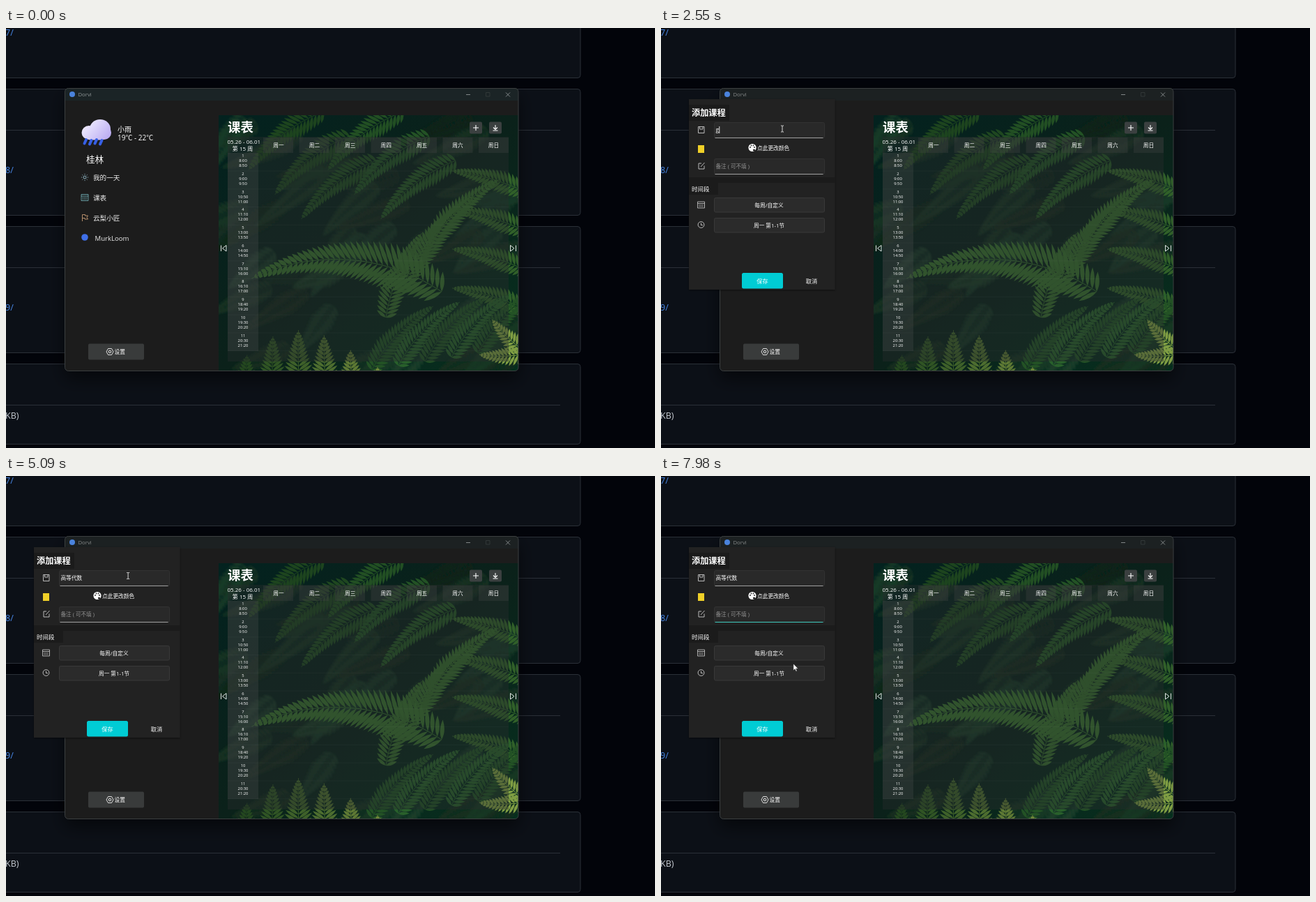
Write an HTML page that moves like this. It is 931 px wide and 602 px high and loops after 8000 ms.

```html
<!DOCTYPE html>
<html lang="zh-CN">
<head>
<meta charset="utf-8">
<style>
html, body { margin: 0; width: 100%; height: 100%; overflow: hidden; background: #02040a; }
svg { display: block; font-family: "Open Sans", "Noto Sans CJK SC", "Noto Sans CJK", sans-serif; }
text { white-space: pre; }
</style>
</head>
<body>
<svg id="stage" width="931" height="602" viewBox="0 0 931 602"></svg>
<script>
const LOOP = 8000, STEP = 200 / 3;
const clamp = v => Math.max(0, Math.min(1, v));
const ease = k => k * k * (3 - 2 * k);

// Markup helpers
const rect = (x, y, w, h, fill, extra = '') =>
  `<rect x="${x}" y="${y}" width="${w}" height="${h}" fill="${fill}" ${extra}/>`;
const text = (x, y, size, str, fill = '#fff', extra = '') =>
  `<text x="${x}" y="${y}" font-size="${size}" fill="${fill}" ${extra}>${str}</text>`;
const mid = (x, y, size, str, fill) => text(x, y, size, str, fill, 'text-anchor="middle"');
const line = (d, stroke = '#ddd', width = .9, extra = '') =>
  `<path d="${d}" fill="none" stroke="${stroke}" stroke-width="${width}" ${extra}/>`;
const dot = (x, y, r, fill, extra = '') => `<circle cx="${x}" cy="${y}" r="${r}" fill="${fill}" ${extra}/>`;
const repeat = (n, make) => Array.from({ length: n }, (_, i) => make(i)).join('');

let seed = 11;
const rnd = (a, b) => a + (b - a) * (seed = seed * 16807 % 2147483647) / 2147483647;

// One fern frond: leaflet pairs along a spine that turns by `bend` degrees
function frond(x, y, heading, length, bend, size, fill) {
  const gap = 3.5 + size * .09, n = Math.round(length / gap);
  let leaves = '', spine = `M${x} ${y}`;
  for (let i = 0; i <= n; i++) {
    const t = i / n, dir = (heading + bend * t) * Math.PI / 180;
    const len = 3 + size * (1 - t) ** .75 * Math.min(1, .55 + t * 2);
    for (const side of [-1, 1]) {
      const a = dir + side * (1.05 - .3 * t), c = Math.cos(a) * len, s = Math.sin(a) * len;
      const k = gap * .8 / len;
      const at = (u, v) => `${(x + c * u - s * v).toFixed(1)} ${(y + s * u + c * v).toFixed(1)}`;
      leaves += `M${at(0, 0)}Q${at(.45, k)} ${at(1, 0)}Q${at(.45, -k)} ${at(0, 0)}`;
    }
    x += Math.cos(dir) * gap;
    y += Math.sin(dir) * gap;
    spine += `L${x.toFixed(1)} ${y.toFixed(1)}`;
  }
  return `<path d="${leaves}" fill="${fill}"/>` + line(spine, fill, 1);
}

const green = (light, hue = 122) => `hsl(${hue} 40% ${light}%)`;

function ferns() {
  const blurred = repeat(40, () =>
    frond(rnd(340, 760), rnd(120, 470), rnd(125, 165), rnd(70, 130), rnd(-20, 20), 24, green(rnd(10, 18), 145)));
  return '<svg x="305" y="125" width="430" height="366" viewBox="305 125 430 366">' +
    rect(305, 125, 430, 366, 'url(#leafBase)') + `<g filter="url(#blur)">${blurred}</g>` +
    repeat(6, i => frond(455 + i * 38, 120 + i % 3 * 35, 158, 130, -32, 25, green(19 + i))) +
    repeat(4, i => frond(745, 235 + i * 56, 205, 105, -18, 22, green(27, 112))) +
    repeat(5, i => frond(525 + i * 38, 490 - i * 6, 298, 120, 32, 23, green(23 + i % 2 * 4))) +
    repeat(4, i => frond(545 + i * 22, 415 - i * 36, 280 + i * 8, 125, 26, 25, green(29, 110))) +
    frond(625, 378, 213, 275, -58, 47, green(31, 112)) +
    repeat(6, i => {
      const height = 40 + 36 * Math.sin(i * .72);
      return frond(345 + i * 38, 514, 268 - i, height, 6, 8 + height * .23, green(20 + i * 3.5, 112 - i * 7));
    }) +
    repeat(2, i => frond(745, 464 + i * 3, 215 - i * 45, 62, 18, 18, green(44, 80))) + '</svg>';
}

function page() {
  const boxes = repeat(4, i => rect(-20, 87.5 + (i - 1) * 197, 844, i < 3 ? 181 : 115, '#0c1017', 'rx="4" stroke="#2b3038"'));
  return rect(0, 0, 931, 602, '#02040a') + boxes +
    repeat(3, i => line(`M0 ${146.5 + i * 197}H795`, '#2b3038', 1) + text(-1, 11 + i * 197, 12.5, 7 + i + '/', '#4787e8')) +
    text(-1, 560, 12.5, 'KB)', '#c4c9d0');
}

const calendar = (x, y, c) => line(`M${x - 5} ${y - 4.5}h10v9h-10zm0 2.5h10`, c, .8) +
  line(`M${x - 3.2} ${y + .3}h7m-7 2h7`, c, 1, 'stroke-dasharray="1.2 1"');

function sidebar() {
  const cloud = '<g fill="url(#cloud)"><ellipse cx="119" cy="150" rx="10.5" ry="10"/><ellipse cx="135" cy="145" rx="15" ry="14"/>' +
    '<ellipse cx="141" cy="150" rx="10" ry="10"/>' + rect(115, 148, 28, 12.5, 'url(#cloud)', 'rx="6"') + '</g>';
  const rain = repeat(4, i => line(`M${115 + i * 7.5} ${160 + i % 2}l-2.5 5.5`, '#3760e6', 4, 'stroke-linecap="round"'));
  const rays = repeat(8, i => line('M113 210.2v-1.3', '#8fb6c4', .9, `transform="rotate(${i * 45} 113 214)"`));
  return cloud + rain + text(160, 149, 10, '小雨') + text(160, 161, 10, '19℃ - 22℃') + text(115, 193, 12.6, '桂林') +
    ['我的一天', '课表', '云梨小匠'].map((str, i) => text(125, 218 + i * 29, 9.6, str, '#eee')).join('') +
    text(127.5, 304.5, 9.6, 'MurkLoom', '#eee') +
    dot(113, 214, 2, 'none', 'stroke="#8fb6c4"') + rays + calendar(113, 243, '#77b9c0') +
    line('M109.500 277v-9.500h4v1.500h4l-1.500 2.500 1.500 2.500h-4.500v-1.500h-3.500', '#c69a73') + dot(113, 300, 4.8, '#3f6fe8') +
    rect(118, 452.5, 80, 23, '#393b3b', 'rx="2"') + line('M146.500 459.500h5l2.500 4.500-2.500 4.500h-5l-2.500-4.500z', '#eee') +
    dot(149, 464, 1.8, 'none', 'stroke="#eee"') + text(155.5, 467, 7.7, '设置');
}

function timetable() {
  const hours = '8:00 8:50 9:00 9:50 10:50 11:00 11:10 12:00 13:00 13:50 14:00 14:50 15:10 16:00 16:10 17:00 18:40 19:20 19:30 20:20 20:30 21:20'.split(' ');
  return text(318, 148.5, 18.4, '课表', '#fff', 'font-weight="700"') +
    rect(665, 134.5, 18, 17, '#3b4040', 'rx="2" id="add"') + rect(693, 134.5, 18, 17, '#3b4040', 'rx="2"') +
    line('M670 143h8m-4-4v8M702 139v6m-3-2.500l3 3 3-3m-6.500 4.500h7', '#fff', 1.1) +
    rect(318, 156, 403, 322, '#282d2b', 'opacity=".42"') + rect(318, 179, 44, 284, '#4a4e4d', 'opacity=".3"') +
    text(317.5, 166, 8, '05.26 - 06.01') + mid(339.5, 176, 8, '第 15 周') +
    repeat(7, i => rect(369 + i * 51.5, 157, 43, 22, '#454848', 'opacity=".3"') +
      mid(391 + i * 51.4, 170.5, 7.7, '周' + '一二三四五六日'[i])) +
    repeat(11, i => {
      const y = 185 + i * 25.77;
      return [i + 1, hours[2 * i], hours[2 * i + 1]].map((v, j) => mid(340, y + j * 7, 5.8, v)).join('') +
        line(`M318 ${y + 20}H721`, '#fff', .6, 'opacity=".06"');
    }) +
    line('M308.500 311.500v8.500M316 311.500v8.500l-5.500-4.250zM731.500 311.500v8.500M723.500 311.500v8.500l5.500-4.250z', '#e4e8e6', 1);
}

function appWindow() {
  return rect(84.5, 86, 650.5, 405.5, '#1f1f1f', 'rx="5" filter="url(#shadow)"') +
    '<g clip-path="url(#round)">' + rect(84, 86, 651, 18, '#1b2426', 'id="bar"') + ferns() + '</g>' +
    rect(84.5, 86.5, 650.5, 405, 'none', 'rx="5" stroke="#3b3f40"') +
    dot(95, 95, 4, '#4a83dc') + text(103.5, 98.3, 7.7, 'Dorvi', '#8f9697', 'id="caption"') +
    line('M660 95.500h6M717 92.500l6 6m0-6l-6 6', '#8d9293') + line('M688.500 92.500h5.500v5.500h-5.500z', '#343a3a') +
    sidebar() + timetable();
}

const field = (y, id) => rect(76.5, y, 158, 22, '#292929', 'rx="2" stroke="#323232"') +
  line(`M77.500 ${y + 22}H232.500`, '#a0a0a0', 1, `id="${id}"`);
const button = (y, label, id = '') =>
  rect(76.5, y, 158, 20.5, '#2b2b2b', `rx="2" stroke="#393939" ${id}`) + mid(155, y + 13, 7.7, label);

function dialog() {
  const palette = dot(131, 171.5, 5.6, '#fff') + dot(133.5, 175, 1.6, '#202020') + repeat(4, i =>
    dot(131 - 3 * Math.cos(i * Math.PI / 3), 171 - 3 * Math.sin(i * Math.PI / 3), .9, '#202020'));
  return rect(40, 102, 209.5, 273, '#202020', 'filter="url(#soft)"') +
    rect(40, 110, 58, 23, '#1b1b1b') + rect(40, 214, 209.5, 8, '#1b1b1b') + rect(40, 222, 42, 17, '#1b1b1b') +
    text(44, 126, 12.2, '添加课程', '#fff', 'font-weight="700"') + text(44, 234, 8.5, '时间段') +
    field(135.5, 'line1') + field(187.5, 'line2') +
    line('M53.500 141.500h8.500v9h-8.500zM55.500 141.500v3.500h4.500v-3.500', '#ccc') +
    rect(53, 168, 9, 11, '#f0d028') + palette + text(138, 174.5, 7.7, '点此更改颜色') +
    line('M58 194h-4v8h8v-4.500M57 199l5.500-6', '#ccc') + text(78.5, 200.5, 7.6, '备注 ( 可不填 )', '#929292') +
    calendar(57.5, 253.5, '#ccc') + button(243.5, '每周/自定义', 'id="weekly"') + button(272.5, '周一 第1-1节') +
    dot(57.5, 282, 4.4, 'none', 'stroke="#ccc" stroke-width=".9"') + line('M57.500 279.500v3h2.500', '#ccc') +
    rect(116, 351, 59, 22.5, '#00ccd4', 'rx="2.500"') + mid(145.5, 365.5, 8.2, '保存') + mid(216, 365.5, 8.2, '取消') +
    '<text id="entry" x="78.500" y="149"></text>';
}

const defs = `<defs>
<linearGradient id="leafBase" x2="1" y2="1"><stop stop-color="#03221f"/><stop offset=".5" stop-color="#0b211a"/><stop offset="1" stop-color="#06301f"/></linearGradient>
<linearGradient id="cloud" gradientUnits="userSpaceOnUse" x1="112" y1="133" x2="146" y2="162"><stop stop-color="#f4f1ff"/><stop offset="1" stop-color="#b9aaf2"/></linearGradient>
<clipPath id="round"><rect x="84.500" y="86" width="650.500" height="405.500" rx="5"/></clipPath>
<filter id="blur"><feGaussianBlur stdDeviation="1.600"/></filter>
<filter id="shadow"><feDropShadow dx="0" dy="11" stdDeviation="12" flood-opacity=".55"/></filter>
<filter id="soft"><feDropShadow dx="0" dy="1" stdDeviation="1.500" flood-opacity=".5"/></filter>
</defs>`;
stage.innerHTML = defs + page() + appWindow() + `<g id="dialog">${dialog()}</g>` +
  rect(0, 0, .9, 10, '#eee', 'id="caret"') + '<g id="ime"></g>' +
  '<path id="arrow" d="M0 0V9.800L2.300 7.700 3.800 11.200 5.400 10.500 3.900 7.200H7Z" fill="#fff" stroke="#111" stroke-width=".6"/>' +
  line('M-2-4.500h1.500L0-4 .5-4.500H2M0-4V4M-2 4.500h1.500L0 4l.5.5H2', '#eee', .9, 'id="beam"');
const el = {};
stage.querySelectorAll('[id]').forEach(e => el[e.id] = e);
const show = (e, on) => e.style.display = on ? '' : 'none';

// Typing: one key per beat, then the chosen word replaces the letters
const TYPE = 2550, COMMIT = 4500, BEAT = 160, WORD = '高等代数';
const SYLLABLES = ['gao', 'deng', 'dai', 'shu'];

function typedAt(t) {
  if (t < TYPE) return ['课程名称', ''];
  if (t >= COMMIT) return [WORD, ''];
  let left = Math.floor((t - TYPE) / BEAT) + 1;
  const parts = [];
  for (const s of SYLLABLES) {
    if (left > 0) parts.push(s.slice(0, left));
    left -= s.length;
  }
  const head = parts.length === 1 ? '高 该 个' : parts.at(-1) === 'den' ? '高扽 高等(děng) 高' : `${WORD.slice(0, parts.length)} 高等 高`;
  return [parts.join("'"), t < TYPE + STEP ? '' : head + ' 稿 搞 告 膏 糕'];
}

function candidates(words, x) {
  let s = '', cx = x + 9.5, first = 0;
  words.split(' ').forEach((word, i) => {
    const label = `${i + 1} ${word}`;
    const wide = [...label].filter(c => c > '\u2fff').length;
    const w = wide * 9 + (label.length - wide) * 4.4;
    first ||= w;
    s += text(cx, 166, 9, label, '#f2f2f2');
    cx += Math.max(41.5, w + 15);
  });
  const width = cx + 63.5 - x;
  return rect(x, 152.5, width, 21, '#202020', 'rx="4" stroke="#343434" stroke-width=".6" filter="url(#soft)"') +
    rect(x + 3, 154.5, first + 14, 17, '#303030', 'rx="2.500"') + rect(x + 3, 158, 1.8, 10, '#4cc2dc', 'rx=".9"') + s +
    line(`M${cx - 5.5} 154v18M${cx + 30} 154v18`, '#383838') +
    `<path d="M${cx + 5} 160.500v5l-4-2.500z" fill="#666"/><path d="M${cx + 16.5} 160v6l4.500-3z" fill="#fff"/>` +
    line(`M${cx + 33} 158.500h8.500v8.500h-8.500z`, '#eee', 1, 'stroke-linejoin="round"') + dot(cx + 40, 160.5, 2.2, '#fff') +
    line(`M${cx + 51.5} 161.500l3.500 3.500 3.500-3.500`, '#eee', 1);
}

let shown, caretX = 78.5;
function type(t) {
  const [str, words] = typedAt(t);
  if (shown === str + words) return;
  shown = str + words;
  el.entry.textContent = str;
  el.entry.setAttribute('font-size', str[0] === 'g' ? 8.3 : 7.7);
  el.entry.setAttribute('fill', t < TYPE ? '#929292' : '#fff');
  caretX = t < TYPE ? 78.5 : 78.8 + el.entry.getComputedTextLength();
  el.ime.innerHTML = words && candidates(words, caretX - 3);
}

// Pointer moves: start, end, x, y
const moves = [[70, 600, 677, 137], [1130, 1600, 177, 152], [1740, 1880, 174, 144.5], [5020, 5090, 175.5, 142.5],
  [5090, 5300, 186, 138.5], [5300, 5890, 145.5, 193], [7060, 7440, 163, 257], [7600, 7980, 191, 269.5]];

function pointer(t) {
  let x = 869, y = 527;
  for (const [start, end, tx, ty] of moves) {
    const k = ease(clamp((t - start) / (end - start)));
    x += (tx - x) * k;
    y += (ty - y) * k;
  }
  return [x, y];
}

function draw() {
  const t = performance.now() % LOOP;
  const open = t >= 930, note = t >= 6090;
  el.dialog.style.opacity = open ? clamp((t - 860) / 200) : 0;
  el.bar.setAttribute('fill', open ? '#1c2122' : '#1b2426');
  el.caption.setAttribute('fill', open ? '#858989' : '#8f9697');
  el.line2.setAttribute('stroke', note ? '#3fc9bd' : '#a0a0a0');
  type(t);

  // The caret blinks from the last focus or key press
  const start = note ? 6090 : t >= COMMIT ? 4230 : 1070;
  const typing = t >= TYPE && t < COMMIT;
  show(el.caret, t >= 1066 && (typing || Math.floor((t - start) / 532) % 2 === 0));
  el.caret.setAttribute('x', note ? 78.5 : caretX);
  el.caret.setAttribute('y', note ? 193 : 141);

  const [x, y] = pointer(Math.floor((t + 4) / STEP) * STEP);
  const over = (x0, y0, x1, y1) => x > x0 && x < x1 && y > y0 && y < y1;
  const beam = (over(76, 135, 235, 158) || over(76, 187, 235, 210)) && !(t >= TYPE + STEP && t < 5085);
  show(el.arrow, t >= 66 && !beam);
  show(el.beam, beam);
  for (const e of [el.arrow, el.beam]) e.setAttribute('transform', `translate(${x} ${y})`);
  el.add.setAttribute('fill', over(665, 134, 683, 152) ? '#464a4a' : '#3b4040');
  el.weekly.setAttribute('fill', over(76, 243, 235, 264) ? '#313131' : '#2b2b2b');
  requestAnimationFrame(draw);
}
draw();
</script>
</body>
</html>
```
